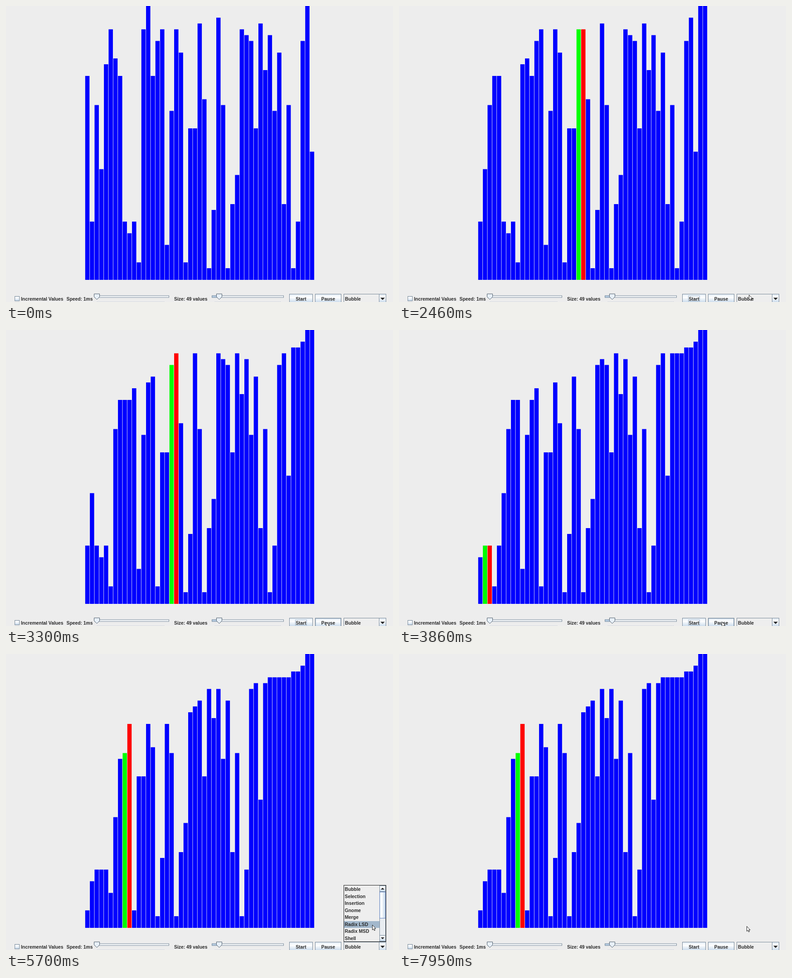
Write an HTML page with a canvas that moves like this. It is 854x656 px and loops after 8 s.

```html
<!DOCTYPE html>
<html lang="en">
<head>
<meta charset="utf-8">
<title>Bubble sort</title>
<style>
  html, body { margin: 0; width: 100%; height: 100%; overflow: hidden; background: #ededed; }
  canvas { display: block; }
</style>
</head>
<body>
<canvas id="stage" width="854" height="656"></canvas>
<script>
const ctx = document.getElementById('stage').getContext('2d');
const SCALE = 854 / 992; // the window is drawn slightly reduced
const LOOP = 8000, TICK = 70;
const POINTER_IN = 520, SORT_START = 1830, PAUSED = 4500, POPUP_OPEN = 5300, POPUP_CLOSE = 7600;
const EDGE = '#7a8a99', ACCENT = '#6382bf', PALE = '#b8cfe5', FOCUS = '#a3b8cc', PANEL = '#ededed';
const ROW = 15.5, LIST_TOP = 514;

// The unsorted input
const VALUES = [35, 10, 30, 19, 37, 43, 38, 35, 10, 8, 10, 3, 43, 47, 35, 41, 43, 6, 29, 43, 39, 3, 26, 26, 44,
  31, 2, 12, 45, 30, 2, 13, 18, 43, 42, 41, 26, 44, 36, 42, 29, 39, 13, 30, 2, 10, 41, 48, 22];
const ALGORITHMS = ['Bubble', 'Selection', 'Insertion', 'Gnome', 'Merge', 'Radix LSD', 'Radix MSD', 'Shell'];

// Key points: [time, value...]
const COMPARISONS = [[SORT_START, 5], [2460, 116], [3300, 248], [PAUSED, 481]];
const POINTER = [[POINTER_IN, 247, 329], [1220, 700, 643], [1600, 656, 645], [SORT_START, 656, 645],
  [2460, 772, 640], [3300, 706, 647], [PAUSED, 718, 645], [4830, 718, 645], [POPUP_OPEN, 828, 641],
  [5700, 808, 600], [6730, 830, 547], [7260, 836, 560], [7550, 838, 448], [7950, 767, 603]];

function tween(keys, t) {
  const next = keys.findIndex(key => key[0] > t);
  if (next < 0) return keys[keys.length - 1].slice(1);
  if (next === 0) return keys[0].slice(1);
  const a = keys[next - 1], b = keys[next], p = (t - a[0]) / (b[0] - a[0]);
  return a.slice(1).map((v, i) => v + (b[i + 1] - v) * p);
}

function sortedFor(steps) {
  const list = VALUES.slice();
  let j = 0, end = list.length - 1;
  for (let n = 0; n < steps; n++) {
    if (list[j] > list[j + 1]) [list[j], list[j + 1]] = [list[j + 1], list[j]];
    if (++j === end) { j = 0; end--; }
  }
  return { list, j };
}

function fill(x, y, w, h, color) {
  ctx.fillStyle = color;
  ctx.fillRect(x, y, w, h);
}

function frame(x, y, w, h, color) {
  ctx.strokeStyle = color;
  ctx.strokeRect(x + .5, y + .5, w - 1, h - 1);
}

function shape(points, color, stroke) {
  ctx.beginPath();
  points.forEach(([x, y]) => ctx.lineTo(x, y));
  ctx.closePath();
  ctx.fillStyle = color;
  ctx.fill();
  if (stroke) {
    ctx.strokeStyle = stroke;
    ctx.stroke();
  }
}

function label(text, x, y, align = 'left') {
  ctx.font = `bold ${12 * SCALE}px "Liberation Sans", Arial, sans-serif`;
  ctx.textAlign = align;
  ctx.fillStyle = '#2b2b2b';
  ctx.fillText(text, x, y);
}

// Glossy surface shared by every control
function glossy(x, y, w, h, border = EDGE, sideways = false) {
  const g = sideways ? ctx.createLinearGradient(x, 0, x + w, 0) : ctx.createLinearGradient(0, y, 0, y + h);
  ['#dde8f3', '#fff', '#dde8f3', PALE].forEach((color, i) => g.addColorStop(i / 3, color));
  fill(x, y, w, h, g);
  frame(x, y, w, h, border);
}

function arrow(x, y, size, dir) {
  shape([[x - size, y - dir * size / 2], [x + size, y - dir * size / 2], [x, y + dir * size / 2]], '#222');
}

function drawBars(t) {
  const running = t >= SORT_START;
  const { list, j } = sortedFor(running ? Math.round(tween(COMPARISONS, t)[0]) : 0);
  ctx.save();
  ctx.scale(SCALE, SCALE);
  list.forEach((v, i) => {
    const color = running && i === j ? '#0f0' : running && i === j + 1 ? '#f00' : '#00f';
    fill(203 + i * 12, 705 - v * 15, 11, v * 15, color);
  });
  ctx.restore();
}

function slider(left, right, thumb, tickStart, tickEnd) {
  fill(left, 641.5, right - left, 5, '#f4f7fa');
  fill(left, 641.5, thumb - left, 5, PALE);
  frame(left, 641.5, right - left, 5, EDGE);
  for (let x = tickStart; x < tickEnd; x += 3) fill(x, 655, 1, 1, '#a9b7c5');
  const x = thumb + .5;
  shape([[x - 6, 638], [x + 6, 638], [x + 6, 644.5], [x, 650.5], [x - 6, 644.5]], '#e8f0f8', '#4f5d6b');
}

function button(text, x, w, focused, [px, py]) {
  glossy(x, 638, w, 22);
  const hovered = px >= x && px < x + w && py >= 638;
  if (hovered) frame(x + 1, 639, w - 2, 20, FOCUS);
  label(text, x + w / 2, 652.5, 'center');
  if (focused) {
    const textWidth = Math.round(ctx.measureText(text).width) + 2;
    frame(Math.round(x + w / 2 - textWidth / 2), 642, textWidth, 13, FOCUS);
  }
}

function drawControls(t, pointer) {
  glossy(19, 643, 11, 11);
  label('Incremental Values', 33, 652.5);
  label('Speed: 1ms', 133.5, 652.5);
  slider(195, 360, 200, 201, 350);
  label('Size: 49 values', 371, 652.5);
  slider(454, 613, 470, 461, 606);
  button('Start', 625, 52, t >= SORT_START && t < PAUSED, pointer);
  button('Pause', 682, 58, t >= PAUSED && t < POPUP_OPEN, pointer);
  fill(745, 638, 94, 22, '#eee');
  frame(745, 638, 94, 22, EDGE);
  glossy(823, 638, 16, 22);
  arrow(831, 649, 5, 1);
  label('Bubble', 748, 652.5);
}

function drawPopup(pointerY) {
  const hovered = Math.floor((pointerY - LIST_TOP) / ROW);
  const row = hovered in ALGORITHMS ? hovered : 0;
  fill(745, 512, 94, 126, '#eee');
  fill(746, Math.round(LIST_TOP + row * ROW), 78, 15, FOCUS);
  ALGORITHMS.forEach((name, i) => label(name, 747.5, LIST_TOP + 11 + i * ROW));
  fill(824, 513, 14, 124, '#e9edf1');
  frame(824, 513, 14, 124, EDGE);
  glossy(824, 513, 14, 14);
  arrow(831, 520, 4, -1);
  glossy(824, 527, 14, 59, ACCENT, true);
  glossy(824, 623, 14, 14);
  arrow(831, 630, 4, 1);
  frame(745, 512, 94, 126, '#222');
}

function drawPointer([px, py]) {
  const outline = [[0, 0], [0, 11], [2.5, 8.8], [4.2, 12.5], [6, 11.7], [4.3, 8], [7.5, 8]];
  shape(outline.map(([x, y]) => [px + x + .5, py + y + .5]), '#fff', '#222');
}

function draw(time) {
  const t = time < PAUSED ? SORT_START + Math.floor((time - SORT_START) / TICK) * TICK : time;
  const pointer = tween(POINTER, t).map(Math.round);
  fill(0, 0, 854, 656, PANEL);
  drawBars(t);
  drawControls(t, pointer);
  if (t >= POPUP_OPEN && t < POPUP_CLOSE) drawPopup(pointer[1]);
  if (time >= POINTER_IN) drawPointer(pointer);
}

const start = performance.now();
function loop() {
  draw((performance.now() - start) % LOOP);
  requestAnimationFrame(loop);
}
loop();
</script>
</body>
</html>
```
